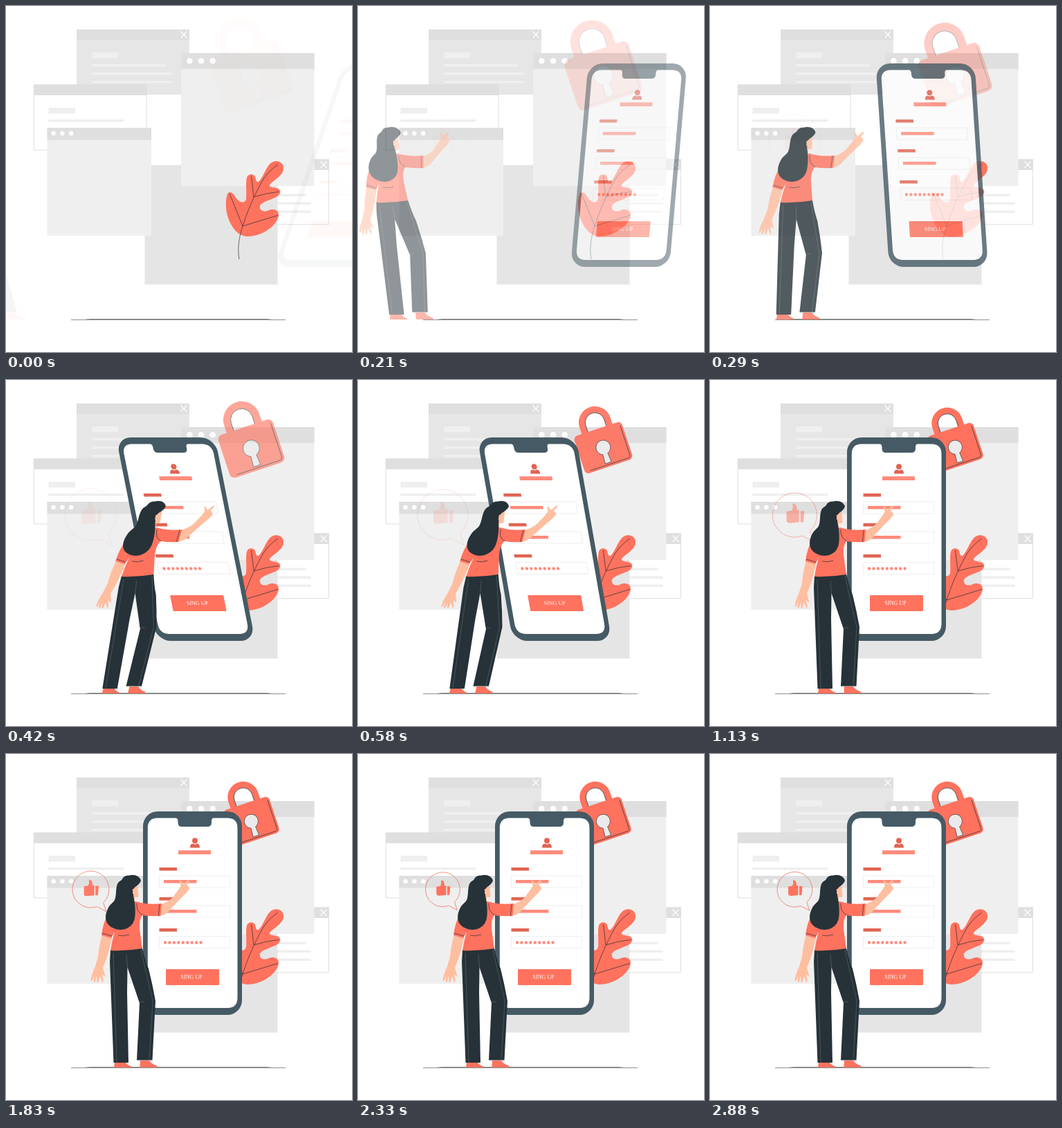
An HTML page that plays this animation: 500x500 px, repeating every 2.93 s.

```html
<!DOCTYPE html>
<html lang="en">
<head>
<meta charset="utf-8">
<title>Sign up</title>
<style>
  html, body { margin: 0; width: 100%; height: 100%; overflow: hidden; background: #fff; }
  svg { display: block; width: 100%; height: 100%; }
  .bar { fill: #dfdfdf; }
  .pane { fill: #efefef; }
  .outline { fill: #fff; stroke: #e0e0e0; }
  .coral { fill: #ff725e; }
  .pale { fill: #ff8b7b; }
  .deep { fill: #e06452; }
  .skin { fill: #ffbe9f; }
  .dark { fill: #263238; }
  .ink { fill: none; stroke: #263238; stroke-width: .7; }
  .seam { fill: none; stroke: #66747a; stroke-width: .5; }
  .cross { stroke: #fff; stroke-width: 1.2; }
  .field { fill: #fff; stroke: #e3e3e3; stroke-width: .6; }
  .button { font: 8px "Liberation Serif", "Times New Roman", serif; fill: #fff; text-anchor: middle; }
</style>
</head>
<body>
<svg viewBox="0 0 500 500">
  <g id="windows">
    <path d="M102 34h163v94H102z" fill="#e6e6e6"/>
    <path class="bar" d="M102 34h163v15H102z"/>
    <path class="cross" d="M252.500 36.500l9 9.500m0-9.500l-9 9.500"/>
    <path class="pane" d="M124 67h38v8.500h-38zM124 84h108v3.500H124zM124 96h115.500v3.500H124zM124 108h115.500v3.500H124z"/>

    <path class="outline" d="M40.300 114h162.700v94H40.300z"/>
    <path class="bar" d="M40 113.500h163.500V129H40z"/>
    <path class="pane" d="M61.500 147H100v8.500H61.500zM61.500 164h108.500v3.500H61.500z"/>

    <path class="outline" d="M304 222h162.400v93.700H304z"/>
    <path class="bar" d="M304 221.500h163V237H304z"/>
    <path class="cross" d="M454.500 224.500l9 9.500m0-9.500l-9 9.500"/>
    <path class="pane" d="M325 271.500h108.500v3.500H325zM325 283.500h115.500v3.500H325zM325 295.500h115.500v3.500H325z"/>

    <path d="M200.500 230h192v172.500h-192z" fill="#e5e5e5"/>

    <path class="pane" d="M253 68h192.500v192H253z"/>
    <path class="bar" d="M253 68h192.500v23H253z"/>
    <g fill="#fff"><circle cx="265.300" cy="79.300" r="4.300"/><circle cx="282" cy="79.300" r="4.300"/><circle cx="298.700" cy="79.300" r="4.300"/></g>

    <path class="pane" d="M59.500 176H210v156H59.500z"/>
    <path class="bar" d="M59.500 176H210v17.500H59.500z"/>
    <g fill="#fff"><circle cx="68.600" cy="184" r="3.200"/><circle cx="81.400" cy="184" r="3.200"/><circle cx="94.200" cy="184" r="3.200"/></g>
  </g>

  <path d="M94 453.500H404" stroke="#777" stroke-width=".8"/>
  <path d="M113 453.800Q116 452 122 452H376Q382 452 385 453.800z" fill="#858988"/>

  <g id="leaf">
    <path class="coral" d="M321 270C326 267 330 273 333 278C336 283 345 287 347 279C348 268 346 256 348 248C350 242 358 242 360 247C362 252 361 256 366 253C372 247 376 231 384 226C391 222 400 225 401 233C402 243 391 249 382 257C378 262 386 262 391 263C398 265 398 271 392 275C385 280 370 282 367 289C366 295 371 298 378 296C385 292 394 294 394 302C393 316 371 333 349 333C335 333 325 319 320 303C317 292 317 276 321 270Z"/>
    <path class="ink" d="M337 366C334 350 337 333 342 318C348 300 356 278 372 250Q380 238 393 229M342 318L323 271M342 318L393 302.500M358 276L354.500 246M358 276Q377 270 394 268.500"/>
  </g>

  <g id="lock">
    <g transform="translate(354.500 97.500) rotate(-18.400)">
      <path d="M-18 -26V-37a18 18 0 0 1 36 0V-26" fill="none" stroke="#ff725e" stroke-width="9"/>
      <path class="ink" d="M-13.500 -27V-37a13.500 13.500 0 0 1 27 0V-27"/>
      <rect class="coral" x="-35" y="-27.500" width="70" height="55" rx="6"/>
      <path class="ink" d="M-27 24.500H28Q32 24.500 32 20V-22"/>
      <path d="M-3.500 9L-4.500 22H4.500L3.500 9A10 10 0 1 0 -3.500 9Z" fill="#ebebeb" stroke="#263238" stroke-width=".6"/>
    </g>
  </g>

  <g id="phone">
    <rect x="198" y="83" width="143" height="294" rx="21" fill="#455a64"/>
    <path d="M219 92.500H245Q248.500 92.500 248.500 97V99Q248.500 105 254 105H291Q297 105 297 99V97Q297 92.500 300 92.500H320Q334.500 92.500 334.500 107V352Q334.500 367 320 367H219Q204.800 367 204.800 352V107Q204.800 92.500 219 92.500Z" fill="#fff"/>
    <g class="deep">
      <circle cx="273" cy="125.300" r="4"/>
      <path d="M266 135.500Q266 129.500 270 129.500Q273 131.500 276 129.500Q280 129.500 280 135.500z"/>
    </g>
    <path class="pale" d="M249 139.300h47v5.700h-47z"/>
    <g id="fields"></g>
    <rect class="coral" x="231" y="311" width="77" height="23" rx="1"/>
    <text class="button" x="268" y="325.300">SING UP</text>
  </g>

  <g id="bubble">
    <path d="M140 214.300A25.600 25.600 0 1 0 131 219.800L144 226.500Z" fill="none" stroke="#f0705e" stroke-width=".8"/>
    <path class="coral" d="M113 191.500L119 190.500Q121 187 120 182.500Q125 181.500 125 190H127.500V204L117 205Q113.500 205 113 202.500Z"/>
    <path class="coral" d="M129 191H133.700L132.500 204H129z"/>
  </g>

  <g id="woman">
    <path class="skin" d="M139 261Q134 278 133 294Q129 308 124 319L122.500 328L125 327L127 321L126.500 330L129 329L131 321L131.500 330.500L134 329L135.500 321L138.500 328L140 331L140.500 326L138.500 318L143.500 322Q142 315 140 309Q149 288 153 264Z"/>
    <path class="skin" d="M222 218Q236 213 241 207L250 195Q253 191 252.500 188L250.500 183.500Q251.500 181.500 253 184L256.500 188L263.500 181.500Q266 181 264.500 184L261 189Q265 191 265 195Q261 201 255 206L238 224Q232 233 222 234Z"/>
    <path class="coral" d="M157 446H173Q175 449 181 451.500V453H156zM194 443H207Q210 448 218 450.500Q220 453 217 453H193.500z"/>
    <path class="dark" d="M190 281H197Q201 298 206 310Q212 334 216 357L211.500 442.500H189L193 360L175.500 308L175 345L177 446H155.500L150 300L151 283Z"/>
    <path class="seam" d="M155 288L160 445M195 283Q203 320 212 357L207 442M193 358H200M174 290L175.500 308"/>
    <path class="coral" d="M185 213Q190 213 195 215Q210 218 225 216L223.500 234Q210 235 197 233Q192 240 193 252Q195 268 197 281Q174 285 151 284Q153 270 157 257L152 266L138 262Q140 244 148 230Z"/>
    <path class="ink" d="M222 217L220.500 234M139 259L153 263M162 262Q170 264 178 261M198 233Q188 228 189 216"/>
    <path class="skin" d="M180 190H190.500L191.500 206Q189 208 186 207V214L179 214Z"/>
    <path class="dark" d="M178 175.500C185 173 194 177 195 183C193 189 187 191 185 194C182 202 186 210 186.500 220C187 230 187 239 183 245C176 255 163 256 154 251C143 246 142 234 147 224C150 217 155 215 157 211C160 205 158 195 161 188C163 183 167 184 169 179Q172 175 178 175.500Z"/>
    <path class="skin" d="M183 195Q187 194 186 199Q185 202 183 202Z"/>
  </g>
</svg>
<script>
const LOOP = 2930, TICK = 1000 / 24, LEAD = 0.025;
const byId = id => document.getElementById(id);
const [lock, phone, bubble, woman] = ['lock', 'phone', 'bubble', 'woman'].map(byId);

// Form rows: label, box and value (the last one is a masked password)
byId('fields').innerHTML = [0, 1, 2].map(i => {
  const y = [164, 207, 252][i];
  const boxY = [176, 219, 263.3][i];
  const value = i < 2
    ? `<rect class="pale" x="228" y="${boxY + 6}" width="47.500" height="4.600"/>`
    : Array.from({ length: 9 }, (_, n) => `<circle class="pale" cx="${230 + n * 6.45}" cy="272.500" r="2.200"/>`).join('');
  return `<rect class="deep" x="221.500" y="${y}" width="25.500" height="4.600"/>
    <rect class="field" x="221.500" y="${boxY}" width="102.500" height="17"/>${value}`;
}).join('');

// cubic-bezier(.36, -.01, .5, 1.38)
function ease(x) {
  if (x <= 0) return 0;
  if (x >= 1) return 1;
  const curve = (s, a, b) => 3 * (1 - s) ** 2 * s * a + 3 * (1 - s) * s * s * b + s ** 3;
  let low = 0, high = 1;
  for (let i = 0; i < 24; i++) {
    const mid = (low + high) / 2;
    if (curve(mid, .36, .5) < x) low = mid; else high = mid;
  }
  return curve(low, -.01, 1.38);
}

const mix = (a, b, p) => a + (b - a) * p;
const slope = degrees => Math.tan(degrees * Math.PI / 180);
const fade = (el, p) => el.setAttribute('opacity', Math.min(1, Math.max(0, p)));

// Slides in from one side, easing each leg of the skew separately
function speedIn(el, time, side, centerY) {
  const legs = [[0, .6, -20, 10], [.6, .8, 10, -2], [.8, 1, -2, 0]];
  const [start, end, from, to] = legs.find(leg => time < leg[1]) || legs[2];
  const p = ease((time - start) / (end - start));
  const skew = side * mix(slope(from), slope(to), p);
  const shift = start === 0 ? side * 250 * (1 - p) : 0;
  el.setAttribute('transform', `matrix(1 0 ${skew} 1 ${shift - skew * centerY} 0)`);
  fade(el, start === 0 ? p : 1);
}

function zoomOut(el, time, duration, x, y) {
  const p = ease(time / duration);
  el.setAttribute('transform', `translate(${x} ${y}) scale(${mix(1.5, 1, p)}) translate(${-x} ${-y})`);
  fade(el, p);
}

function draw(ms) {
  const step = Math.max(1, Math.floor((ms + 5) / TICK));
  const time = step * TICK / 1000 + LEAD;
  speedIn(phone, time, 1, 230);
  speedIn(woman, time, -1, 314);
  zoomOut(lock, time, 1, 354.3, 88.7);
  zoomOut(bubble, time, 3, 122.5, 198);
}

const began = performance.now();
function tick() {
  draw((performance.now() - began) % LOOP);
  requestAnimationFrame(tick);
}
tick();
</script>
</body>
</html>
```
